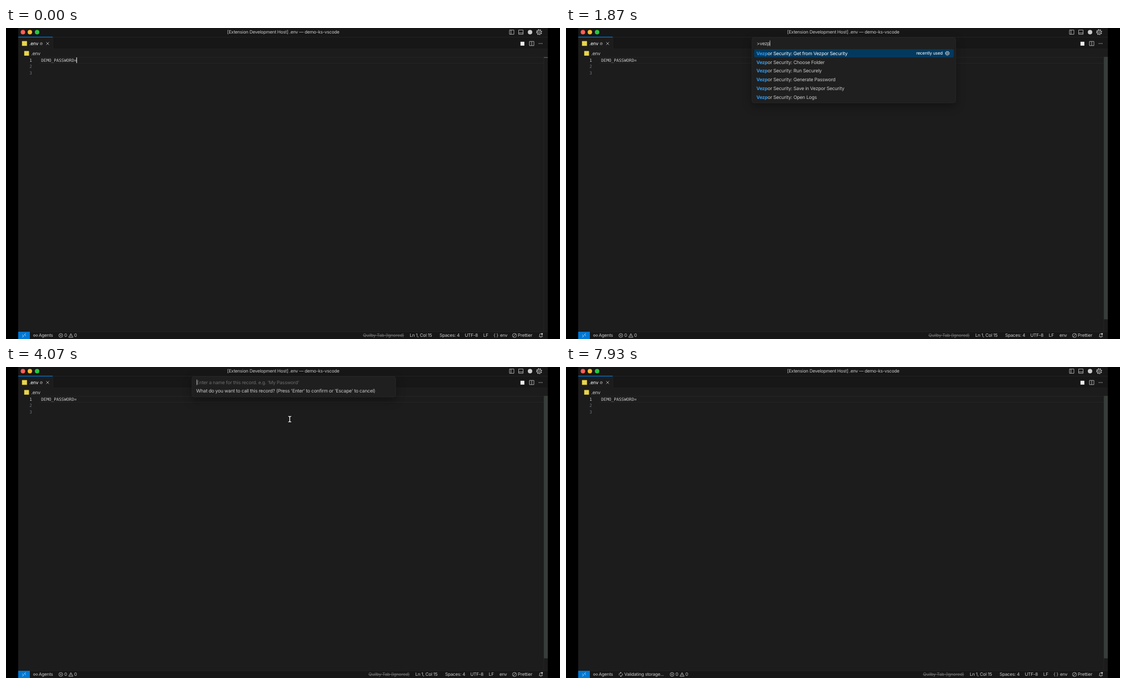
An HTML page for the animation above (8000 ms loop, 998 by 561 pixels).

```html
<!DOCTYPE html>
<html lang="en">
<head>
<meta charset="utf-8">
<title>Generate a password</title>
<style>
html, body { margin: 0; width: 100%; height: 100%; overflow: hidden; background: #000; }
svg { display: block; width: 998px; height: 561px; }
text { font: 8.55px Inter, sans-serif; letter-spacing: -.024em; fill: #ccc; white-space: pre; text-rendering: geometricPrecision; }
.s { font-size: 8.05px; }
.mono { font: 7.6px "DejaVu Sans Mono", monospace; letter-spacing: 0; }
.key { font: 6.4px Inter, "DejaVu Sans", sans-serif; text-anchor: middle; letter-spacing: 0; }
.mid { text-anchor: middle; }
.end { text-anchor: end; font-size: 7.8px; }
.hl { fill: #2f9bf0; font-weight: 700; }
.blue { fill: #3794ff; }
.white { fill: #fff; }
.dim { fill: #6e7681; }
.ghost { fill: #6c6c6c; }
.strike { text-decoration: line-through; fill: #777; }
.icon { fill: none; stroke: #ccc; stroke-width: .8; }
.panel { fill: #1f1f1f; stroke: #2b2b2b; stroke-width: .7; filter: drop-shadow(0 6px 8px rgba(0,0,0,.34)); }
</style>
</head>
<body>
<svg viewBox="0 0 998 561">
  <defs><clipPath id="list"><rect x="335" y="17" width="367" height="251.5"/></clipPath></defs>
  <g id="base"></g>
  <g id="live"></g>
</svg>
<script>
const LOOP = 8000;
const NAME = 'Vezpor', BRAND = NAME + ' Security';
const OPEN = 870, ASK = 4045, CLOSE = 7365;

const recent = ['Get from ' + BRAND, 'Choose Folder', 'Run Securely', 'Generate Password',
  'Save in ' + BRAND, 'Open Logs'].map(s => BRAND + ': ' + s);
const allRows = [
  ...recent.slice(0, 5).map(s => [s]),
  ['Developer: Reload Window', '⇧⌘R'], ['View: Toggle Word Wrap', '⌥Z'],
  ['Extensions: Install from VSIX...'], [recent[5]],
  ['Show All Commands', '⇧⌘P'], ['Format Document', '⇧⌥F'],
  ['Accounts: Manage Trusted Extensions For Account'],
  ['Add Cursor Above', '⌥⌘↑'], ['Add Cursor Below', '⌥⌘↓'], ['Add Cursors to Bottom']
];

// Key press times
const searchKeys = [1690, 1740, 1800, 1870, 1930, 2000];
const recordName = 'Demo password';
const recordKeys = [5530, 5660, 5800, 5930, 6190, 6460, 6520, 6660, 6720, 6995, 7065, 7130, 7200];
const pressed = (keys, t) => keys.filter(k => t >= k).length;

// Spans in which each caret is lit
const editorCaret = [[0, 70], [570, OPEN], [CLOSE, 7865]];
const inputCaret = [[OPEN, 1370], [1690, 2330], [2830, 3330], [3830, 4570], [5070, CLOSE]];
const within = (spans, t) => spans.some(([a, b]) => t >= a && t < b);

const pointer = [[330, 236, 97], [660, 239, 80], [870, 239, 80], [1300, 239, 77.5], [2600, 239, 77.5],
  [3200, 350, 93], [3400, 422, 94], [3950, 507, 89], [4270, 507, 89], [4650, 520, 32],
  [4950, 518, 40], [5260, 503, 89], [5530, 503, 89]];
const bar = [[330, 0], [430, 1], [2330, 1], [3130, 0], [4040, 0], [4060, 1], [4500, 1],
  [5130, .25], [5230, 1], [8000, 1]];

// Values between steps of a [time, ...values] table
function at(table, t) {
  const i = table.findIndex(k => k[0] > t);
  if (i === 0) return table[0].slice(1);
  if (i < 0) return table[table.length - 1].slice(1);
  const a = table[i - 1], b = table[i], p = (t - a[0]) / (b[0] - a[0]);
  return a.slice(1).map((v, n) => v + (b[n + 1] - v) * p);
}

const rect = (x, y, w, h, fill, more = '') => `<rect x="${x}" y="${y}" width="${w}" height="${h}" fill="${fill}" ${more}/>`;
const dot = (x, y, r, fill) => `<circle cx="${x}" cy="${y}" r="${r}" fill="${fill}"/>`;
const text = (x, y, s, cls = '') => `<text x="${x}" y="${y}" class="${cls}">${s}</text>`;
const icon = (x, y, d, more = '', turn = 0) =>
  `<path class="icon" transform="translate(${x} ${y}) rotate(${turn})" d="${d}" ${more}/>`;
const ring = r => `M${-r} 0a${r} ${r} 0 1 0 ${2 * r} 0a${r} ${r} 0 1 0 ${-2 * r} 0`;
const gear = (x, y, r) => icon(x, y, ring(r * .72) + ring(r * .3)) +
  icon(x, y, ring(r * .9), `stroke-dasharray="${r * .353}" style="stroke-width:${r * .3}"`);

function base() {
  const frame = 'M-4 -3.8H4V3.8H-4Z';
  return rect(22, 0, 954, 561, '#1c1c1c') +
    rect(22, 0, 954, 38, '#171717') + rect(22, 16, 954, .7, '#282828') +
    rect(22, 37.6, 954, .6, '#262626') +
    rect(22, 16, 62, 22.4, '#1c1c1c') + rect(22, 15.8, 62, 1.3, '#0078d4') + rect(84, 16, .6, 22, '#282828') +
    dot(30.5, 7.5, 4, '#fe5f57') + dot(43, 7.5, 4, '#febc2e') + dot(56, 7.5, 4, '#28c840') +
    text(499.5, 10.4, '[Extension Development Host] .env — demo-ks-vscode', 's mid') +
    icon(911, 7.5, frame + 'M-1.2 -3.8V3.8') + icon(927.5, 7.5, frame + 'M-4 1.4H4') +
    dot(944, 7.5, 4, '#ccc') + gear(960.5, 7.5, 5) +
    rect(28.8, 23.6, 9, 8.6, '#e8d44d') + text(42, 31, '.env', 'white') +
    icon(63.5, 28.3, ring(2) + 'M-1.4 1.4L1.4 -1.4', 'opacity=".8"') + icon(75, 28, 'M-2.5 -2.5L2.5 2.5M2.5 -2.5L-2.5 2.5') +
    rect(926.8, 24.8, 7, 7, '#eee') + icon(947, 28, frame + 'M0 -3.8V3.8') +
    [-2.6, 0, 2.6].map(d => dot(963 + d, 28, .7, '#ccc')).join('') +
    rect(32.8, 41.5, 8.6, 8.4, '#e8d44d') + text(45.5, 48.9, '.env') +
    rect(60, 52.7, 909, .7, '#292929') + rect(60, 63, 909, .7, '#292929') +
    [1, 2, 3].map(n => text(42.3, 49.4 + 11.45 * n, n, 'mono' + (n > 1 ? ' dim' : ''))).join('') +
    text(63.3, 60.8, 'DEMO_PASSWORD=', 'mono') +
    rect(968.6, 53, .6, 495, '#292929') + rect(969, 52.6, 7, 1.2, '#6b6a4a') +
    rect(22, 548, 954, 13, '#171717') + rect(22, 547.7, 954, .6, '#282828') +
    rect(22, 548, 21, 13, '#0078d4') +
    icon(32.5, 554.5, 'M-3 -1L-.8 1.2L-3 3.4M3 -3.4L.8 -1.2L3 1', 'style="stroke:#fff"') +
    icon(51, 554.7, ring(1.6)) + icon(55.4, 554.7, ring(1.6)) + text(59, 557.4, 'Agents', 's') +
    icon(916, 554.6, ring(3.6) + 'M-2.5 2.5L2.5 -2.5') + text(922, 557.4, 'Prettier', 's') +
    icon(963.5, 554.6, 'M-3 2.2H3L2.2 .8V-1A2.2 2.2 0 0 0 -2.2 -1V.8ZM-.8 3.4H.8') + dot(965.6, 551.8, 1.5, '#ccc');
}

function status(t) {
  const focused = t < OPEN || t >= CLOSE, busy = t >= CLOSE;
  const dx = focused ? 0 : 10, left = busy ? 92.3 : 0, y = 557.4;
  let out = text(643 + dx, y, 'Quilby Tab (Ignored)', 's strike') + text(727.3 + dx, y, 'Ln 1, Col 15', 's') +
    text(781 + dx, y, 'Spaces: 4', 's') + text(826.5 + dx, y, 'UTF-8', 's') + text(859.8 + dx, y, 'LF', 's') +
    text(focused ? 890 : 889, y, 'env', 's');
  if (focused) out += text(878.3, y, '{ }', 's');
  if (busy) {
    out += icon(98.7, 554.6, 'M-3 -.6A3 3 0 0 1 2.5 -1.7M2.7 -3.6V-1.5H.6M3 .6A3 3 0 0 1 -2.5 1.7M-2.7 3.6V1.5H-.6',
      '', Math.round((t - CLOSE) * .24)) + text(105, y, 'Validating storage...', 's');
  }
  return out + icon(98.7 + left, 554.6, ring(3.5) + 'M-1.4 -1.4L1.4 1.4M1.4 -1.4L-1.4 1.4') +
    text(105 + left, y, '0', 's') + icon(116.8 + left, 554.6, 'M0 -3.4L3.8 3.3H-3.8ZM0 -1V1.2M0 1.9V2.6') +
    text(122.8 + left, y, '0', 's');
}

const panel = bottom => `<rect class="panel" x="335" y="17" width="367" height="${bottom - 17}" rx="4"/>`;
const inputLine = (x, lit) => lit ? rect(x, 22.6, .8, 10, '#ddd') : '';

function keycaps(keys, y) {
  return [...keys].map((k, i) => {
    const x = 690 - 13.6 * (keys.length - 1 - i);
    return rect(x - 4.7, y - 4.8, 9.4, 9.6, '#2b2b2b', 'rx="2" stroke="#383838" stroke-width=".5"') +
      text(x, y + 2.3, k, 'key');
  }).join('');
}

function palette(t) {
  const typed = pressed(searchKeys, t);
  const rows = typed ? recent.map(s => [s]) : allRows;
  const picked = t < 2400 ? 0 : t < 2610 ? 1 : t < 2820 ? 2 : 3;
  let out = '';
  rows.forEach(([label, keys], i) => {
    const y = 45.6 + 15.81 * i, on = i === picked;
    if (on) out += rect(339, y - 7.4, 359.5, 14.8, '#04395e', 'rx="2"') + gear(687, y, 3.9);
    const shown = typed ? `<tspan class="hl">${label.slice(0, typed)}</tspan>${label.slice(typed)}` : label;
    out += text(343, y + 3.1, shown, on ? 'white' : '');
    if (i === 0) out += text(on ? 678.5 : 692.5, y + 2.8, 'recently used', on ? 'end white' : 'end blue');
    if (i === 11) out += rect(339, y - 7.6, 359.5, .7, '#363636') + text(692.5, y + 2.8, 'other commands', 'end blue');
    if (keys) out += keycaps(keys, y);
  });
  return panel(typed ? 135 : 268.7) + `<g clip-path="url(#list)">${out}</g>` +
    text(343.5, 30.9, '&gt;' + NAME.toLowerCase().slice(0, typed)) +
    inputLine(349.5 + typed * 4.35, within(inputCaret, t));
}

const pen = document.createElement('canvas').getContext('2d');
function prompt(t) {
  const value = recordName.slice(0, pressed(recordKeys, t));
  pen.font = '8.55px Inter, sans-serif';
  const width = pen.measureText(value).width - value.length * .205;
  return panel(54) +
    text(343.5, 30.9, value || "Enter a name for this record. e.g. 'My Password'", value ? '' : 'ghost') +
    text(342.5, 46, "What do you want to call this record? (Press 'Enter' to confirm or 'Escape' to cancel)") +
    inputLine(343.5 + width, within(inputCaret, t));
}

function mouse(t) {
  if (!within([[330, 1690], [2600, 5530]], t)) return '';
  const [x, y] = at(pointer, t);
  if (t < OPEN || (t >= ASK && t < 4270)) {
    const beam = 'M-2.6 -5Q0 -5 0 -3.4Q0 -5 2.6 -5M0 -3.4V3.4M-2.6 5Q0 5 0 3.4Q0 5 2.6 5';
    return icon(x + 4.2, y + 5, beam, 'style="stroke:#000;stroke-width:2.8"') +
      icon(x + 4.2, y + 5, beam, 'style="stroke:#eee;stroke-width:1.5"');
  }
  return `<path transform="translate(${x} ${y})" d="M0 0V8.8L2 7L3.5 10.2L5 9.5L3.6 6.4H6.3Z" fill="#000" stroke="#eee" stroke-width=".8"/>`;
}

function live(t) {
  let out = rect(969, 53, 7, 472.5, '#373d3a', `opacity="${at(bar, t)[0].toFixed(3)}"`) + status(t);
  if (within(editorCaret, t)) out += rect(126.7, 53, 1.2, 10.2, '#ddd');
  if (t >= OPEN && t < ASK) out += palette(t);
  if (t >= ASK && t < CLOSE) out += prompt(t);
  return out + mouse(t);
}

const layer = document.getElementById('live');
document.getElementById('base').innerHTML = base();
let last = '';
function draw() {
  const next = live(performance.now() % LOOP);
  if (next !== last) layer.innerHTML = last = next;
  requestAnimationFrame(draw);
}
draw();
</script>
</body>
</html>
```
